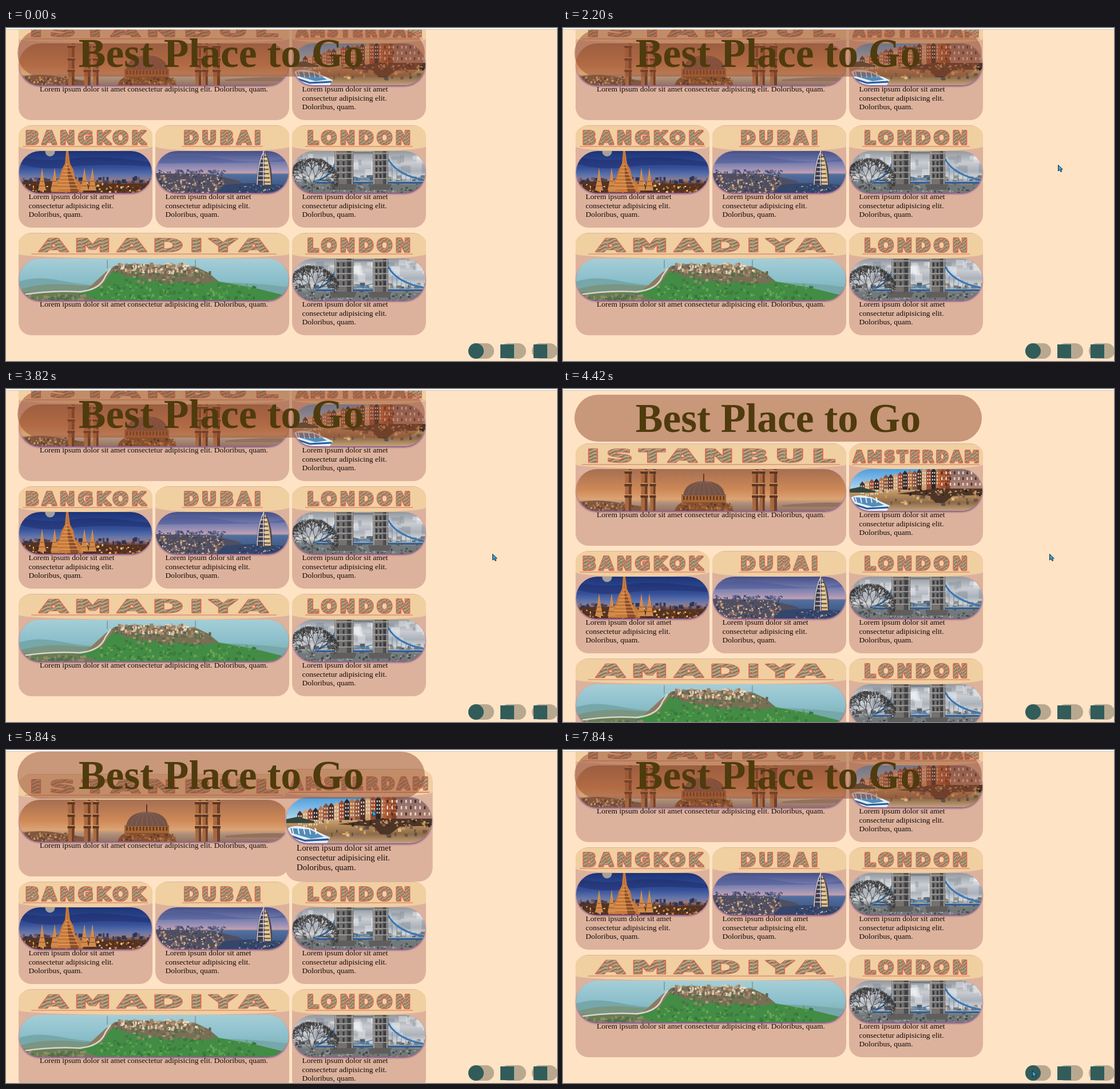
An HTML page that plays this animation: 963 px wide and 582 px high, repeating every 8 s.

```html
<!DOCTYPE html>
<html lang="en">
<head>
<meta charset="utf-8">
<title>Best Place to Go</title>
<style>
  html, body { margin: 0; width: 100%; height: 100%; overflow: hidden; background: #ffe3c5; }
  body { position: relative; font: 13.5px/15.6px "Liberation Serif", "Times New Roman", serif; color: #100c0c; }
  body > *, .card > * { position: absolute; }
  #page { left: 0; top: 0; }
  .card { position: absolute; height: 179px; border-radius: 22px; background: #ddb29c; }
  .banner { left: 0; top: 1px; width: 100%; height: 44px; background: #f0cfa1;
    border-radius: 22px 22px 50% 50% / 16px 16px 8px 8px; }
  .banner text { font: bold 32px "DejaVu Sans", sans-serif; letter-spacing: 5.5px; text-anchor: middle; stroke-linejoin: round; }
  .banner * { vector-effect: non-scaling-stroke; }
  .photo { left: 1px; top: 45px; height: 73px; border-radius: 37px; box-shadow: 0 2px 3px #80508c; }
  .card p { margin: 0; top: 117.5px; }
  #head { left: 20px; width: 712px; height: 82px; border-radius: 41px; background: rgba(147, 76, 48, .5);
    font: bold 71.5px/82px "Liberation Serif", "Times New Roman", serif; color: #4f3b0d; text-align: center; z-index: 2; }
  .pill { top: 551px; width: 45px; height: 27px; border-radius: 13.5px; background: #b9a890; z-index: 3; }
  .pill i { position: absolute; left: 0; top: 1.5px; width: 24px; height: 24px; background: #315c5a; }
  #edge { left: 0; top: 0; width: 100%; height: 2px; background: #fff; border-bottom: 1px solid #cfc4b8; z-index: 4; }
  #cursor { left: 0; top: 0; z-index: 5; overflow: visible; }
</style>
</head>
<body>
<svg width="0" height="0">
  <pattern id="weave" width="9" height="6" patternUnits="userSpaceOnUse">
    <path fill="#a18c6c" d="M0 0H9V6H0Z"/>
    <path stroke="#cbb896" d="M0 5L5 1M5 6L9 3"/>
    <path stroke="#75634a" d="M1 6L6 2M6 0L9 1"/>
  </pattern>
</svg>
<div id="page"></div>
<div id="head">Best Place to Go</div>
<div class="pill" style="left:808px"><i style="width:27px;height:27px;top:0;border-radius:50%"></i></div>
<div class="pill" style="left:864px"><i></i></div>
<div class="pill" style="left:919px"><i style="left:3px"></i></div>
<div id="edge"></div>
<svg id="cursor" width="10" height="14"><path d="M.5.5V11L3 8.7 5 12.5 6.8 11.6 5 8H8.3Z" fill="#35a5dd" stroke="#182a3c"/></svg>
<script>
let seed = 7;
const rnd = () => (seed = seed * 16807 % 2147483647) / 2147483647;
const rect = (x, y, w, h, fill) => `<rect x="${x}" y="${y}" width="${w}" height="${h}" fill="${fill}"/>`;
const path = (d, fill) => `<path d="${d}" fill="${fill}"/>`;
const line = (d, color, width = 1) => `<path d="${d}" fill="none" stroke="${color}" stroke-width="${width}"/>`;
const times = (n, f) => Array.from({ length: n }, (_, i) => f(i)).join('');
const scatter = (n, x, y, w, h, size, ...colors) => times(n, () => rect(x + rnd() * w, y + rnd() * h,
  size * (.5 + rnd()), size * (.5 + rnd()), colors[rnd() * colors.length | 0]));

function branch(x, y, angle, length, depth) {
  const x2 = x + Math.cos(angle) * length, y2 = y + Math.sin(angle) * length;
  const d = `M${x.toFixed(1)} ${y.toFixed(1)}L${x2.toFixed(1)} ${y2.toFixed(1)}`;
  return depth ? d + [-.55, 0, .55].map(a =>
    branch(x2, y2, angle + a + rnd() * .4 - .2, length * .74, depth - 1)).join('') : d;
}

// Each picture gives its sky and the shapes in front of it.
const pictures = {
  ISTANBUL: () => ['#a66f51,#cf8957 50%,#dca474 72%,#ad8f7c 82%,#94745f',
    path('M0 58Q40 51 80 60L120 66V73H0Z', '#80583f') +
    scatter(110, 0, 56, 98, 16, 3, '#a57550', '#5c3e32', '#c8935f', '#714b39') +
    path('M360 63Q420 57 471 59V66H360Z', '#94705e') +
    [[91, 11], [119, 11], [134, 9], [313, 10], [325, 9], [345, 12]].map(([x, w]) =>
      rect(x - w / 2, 0, w, 73, '#a9683c') + rect(x + 1, 0, w / 2 - 1, 73, '#6c402b') +
      [4, 26, 46].map(y => rect(x - w / 2 - 1, y, w + 2, 4, '#593626') + rect(x - w / 2, y - 2, w, 2, '#c98a55')).join('')).join('') +
    path('M172 73Q176 58 196 56H250Q270 58 275 73Z', '#85502f') +
    rect(184, 44, 78, 14, '#a76636') + times(13, i => rect(187 + i * 5.8, 47, 2.5, 7, '#5f3822')) +
    path('M187 46Q190 22 223 21Q257 22 260 46Z', '#745448') +
    times(7, i => line(`M223 21Q${199 + i * 8} 25 ${194 + i * 10} 45`, '#8d6a58', .8)) +
    rect(222, 8, 2, 14, '#5a3b2e') +
    scatter(55, 176, 59, 97, 12, 3, '#bd7a3f', '#5b3828', '#9a6038')],

  AMSTERDAM: () => ['#4f9edd,#a8d2ec 45%,#c99b67 52%,#8d6b4a 80%,#c5a27a',
    times(19, i => {
      const x = 18 + i * 8.3, top = Math.max(0, 19 - i * 1.7 + rnd() * 5);
      const wall = ['#4c2f28', '#8b5138', '#b9744a', '#2f2627', '#a0492f', '#d0a477'][i * 5 % 6];
      return path(`M${x} 36V${top + 3}L${x + 4} ${top - 2}L${x + 8.3} ${top + 3}V36Z`, wall) +
        times(8, j => rect(x + 1.5 + j % 2 * 3.5, top + 5 + (j >> 1) * 6, 1.7, 3, '#eee1ce'));
    }) +
    path('M155 0H233V34H155Z', 'rgba(176,76,35,.6)') +
    times(30, i => rect(160 + i % 10 * 7.4, 4 + (i / 10 | 0) * 10, 2.4, 5, i % 3 ? '#ecd9c2' : '#49291f')) +
    scatter(60, 20, 36, 205, 24, 4, '#cf9d62', '#715640', '#e1bb80', '#57514b') +
    path('M82 43L150 34H233V45L180 47 165 59H150L140 47Z', '#4c3527') +
    scatter(55, 95, 33, 138, 12, 3, '#2d2421', '#8b6544', '#c39867') +
    path('M0 35L18 31 45 38V41H0Z', '#36463b') +
    path('M3 49Q16 42 40 50L70 64 65 73H14L2 61Z', '#e4edf4') +
    path('M7 49L38 51 60 63 40 66 9 57Z', '#548cb8') +
    times(5, i => line(`M${10 + i * 9} 49l2 10`, '#fff', 1.5)) + line('M3 60L30 69 68 67', '#245c9b', 3)],

  BANGKOK: () => ['#1d3477,#344f98 40%,#6377ad 60%,#9a7a83 70%,#6d4635 78%,#40291f',
    `<circle cx="54" cy="1" r="8.5" fill="#a6a09b"/>` + path('M0 10Q50 20 95 13T233 20V27Q140 21 90 28T0 22Z', 'rgba(25,35,95,.4)') +
    scatter(65, 0, 44, 233, 12, 5, '#2d3552', '#49435a', '#68576a') +
    path('M0 55Q50 50 100 55T233 56V73H0Z', '#553321') +
    scatter(130, 0, 54, 233, 18, 2.7, '#d98b39', '#f2c474', '#804420', '#2b2834') +
    path('M82 0H86L89 22 95 33 98 48 110 59 112 72H56L58 59 70 48 74 33 80 22Z', '#c7793d') +
    path('M84 1L85 23 94 47 105 72H90L85 44Z', '#8f4e2b') +
    times(8, i => line(`M${82 - i * 2.6} ${23 + i * 6}h${4 + i * 5.2}`, '#f1b869', 1.2)) +
    [40, 62, 114, 128].map(x => path(`M${x} 29L${x + 3} 49 ${x + 7} 69H${x - 7}L${x - 3} 49Z`, '#d18b4b') +
      line(`M${x - 5} 61h10M${x - 3} 53h6`, '#824924')).join('')],

  DUBAI: () => ['#454f88,#7980af 30%,#b39bb7 49%,#c9a3a7 52%,#536f9f 56%,#334d77',
    path('M0 12Q60 3 120 14T233 11V18Q150 21 100 21T0 22Z', 'rgba(65,80,145,.4)') +
    scatter(65, 0, 32, 120, 7, 3, '#454e74', '#67678a') +
    path('M0 39L100 41 145 52 175 73H0Z', '#504f62') +
    scatter(190, 0, 40, 118, 33, 2.5, '#cda57c', '#816a64', '#303b59', '#ead0a0', '#a27e70') +
    path('M118 60Q165 52 233 61V73H105Z', '#34466b') +
    scatter(35, 145, 58, 87, 14, 2, '#d7b17b', '#70809b', '#1e304d') +
    path('M189 0Q176 20 176 60H203V48Q202 17 189 0Z', '#4a4555') +
    path('M190 2Q200 20 201 59H190Z', '#d9b77a') +
    times(13, i => line(`M${184 - i * .5} ${10 + i * 3.7}H${194 + i * .5}`, i % 2 ? '#ebe0cd' : '#2c324b', 1.3)) +
    line('M189 0Q178 20 177 59M188 0V60', '#e5e4e7', 1.3)],

  LONDON: () => ['#92989f,#c9ccd1 28%,#abb1ba 48%,#d5d5d6 64%,#838b91 76%,#575e60',
    scatter(35, 0, 2, 233, 30, 11, 'rgba(108,116,128,.3)', 'rgba(242,244,247,.4)') +
    scatter(75, 0, 42, 233, 13, 6, '#77797c', '#575c61', '#969187') +
    rect(0, 59, 233, 14, '#737979') + scatter(80, 0, 60, 233, 12, 3, '#9a9e9e', '#555c5d', '#3c464a') +
    line('M74 22Q67 45 39 53M167 14Q181 42 233 52', '#3975b4', 3) +
    line('M74 18Q65 40 41 47M167 10Q187 40 233 49', '#b0c8dc', 1) +
    times(7, i => line(`M${174 + i * 8} ${29 + i * 3}V54`, '#5483aa', .8)) +
    rect(42, 53, 191, 4, '#365e8f') + line('M42 53H233', '#c5d7e3') +
    rect(103, 0, 40, 6, '#72757b') + line('M104 5H143M104 1H143', '#b8bec5') +
    [[73, 33], [140, 27]].map(([x, w]) => rect(x, 0, w, 61, '#74716f') + rect(x + w * .66, 0, w * .34, 61, '#504f51') +
      times(5, i => line(`M${x} ${4 + i * 11}h${w}`, '#aaa59d', 1.3)) +
      times(12, i => rect(x + 5 + i % 3 * (w - 10) / 2.4, 7 + (i / 3 | 0) * 11, 3, 7, '#343b45')) +
      line(`M${x + 2} 0V60m${w - 4} 0V0`, '#a29d97', 2) +
      path(`M${x - 8} 58H${x + w + 6}L${x + w + 2} 68H${x - 5}Z`, '#605e5d')).join('') +
    line('M107 52L140 44M107 45L139 53', '#4a86bd', 1.5) +
    line([-2.5, -1.9, -1.25, -.65].map(a => branch(34, 61, a, 17, 4)).join('') + 'M34 73V58', '#363435', .75)],

  AMADIYA: () => ['#a5ced7,#8bbfcb 50%,#82b4b2 75%,#638c69',
    path('M0 40Q30 30 70 38T150 48L260 42Q380 38 471 50V73H0Z', '#76a7aa') +
    path('M0 54Q45 40 105 47L165 49V73H0Z', '#7a9581') +
    path('M90 73L135 42 164 15 190 10 310 15 331 25 349 40 410 51 471 66V73Z', '#438c45') +
    path('M148 31L166 13 200 9 306 14 331 25 347 40 318 44 287 40 256 43 226 36 187 31 169 21Z', '#796e56') +
    scatter(90, 183, 20, 150, 21, 4, '#958466', '#61634a', '#4d7245', '#b09a78') +
    scatter(140, 167, 7, 140, 16, 4, '#d9c3a3', '#9c8167', '#eee0c9', '#bc9776', '#635e54') +
    scatter(130, 130, 43, 280, 28, 4, '#33793a', '#58a24e', '#6ba557', '#3e7b3d') +
    path('M0 60L95 56 141 73H0Z', '#697d55') + scatter(45, 5, 61, 110, 11, 5, '#8f8d67', '#526e49') +
    path('M115 57L152 23 165 18 144 48Z', '#8b7b61') +
    line('M0 64Q55 55 105 58Q142 55 151 30L160 17', '#d8d7cd', 2.5) +
    line('M154 2V17M308 2V17', '#68757a')]
};

const cards = [['ISTANBUL', 0, 0, 2, 223], ['AMSTERDAM', 2, 0, 1, 224], ['BANGKOK', 0, 1, 1, 219], ['DUBAI', 1, 1, 1, 141],
  ['LONDON', 2, 1, 1, 188], ['AMADIYA', 0, 2, 2, 212], ['LONDON', 2, 2, 1, 188]].map(([city, col, row, span, rule]) => {
  const x = 21.5 + col * 239, y = -18.5 + row * 188, w = span * 239 - 5;
  const [sky, shapes] = pictures[city]();
  const size = city === 'AMSTERDAM' ? 'font-size:26px;letter-spacing:4px' : '';
  const word = (fill, stroke, width) =>
    `<text x="119.5" y="32" style="${size}" fill="${fill}" stroke="${stroke}" stroke-width="${width}">${city}</text>`;
  const el = document.createElement('div');
  el.className = 'card';
  el.style.cssText = `left:${x}px;top:${y}px;width:${w}px`;
  el.innerHTML = `<svg class="banner" viewBox="0 0 234 44" preserveAspectRatio="none">
      ${word('#e5604f', '#e5604f', 4)}${word('url(#weave)', 'url(#weave)', 1.4)}
      ${line(`M${117 - rule / 2} 36h${rule}`, '#d8705a', 1.2)}</svg>
    <svg class="photo" width="${w - 2}" height="73" viewBox="0 0 ${w - 2} 73" style="background:linear-gradient(${sky})">${shapes}</svg>
    <p style="left:${span > 1 ? 37.5 : 18}px;width:${span > 1 ? 420 : 180}px">Lorem ipsum dolor sit amet consectetur adipisicing elit. Doloribus, quam.</p>`;
  page.append(el);
  return { el, x, y, w };
});

// Time, then pointer position; every pose is held until the next.
const moves = [[0, 980, 600], [200, 940, 540], [400, 915, 480], [600, 890, 430], [800, 860, 385], [1000, 828, 345], [1180, 795, 319],
  [1380, 758, 424], [1580, 700, 440], [1780, 690, 425], [2000, 790, 330], [2200, 865, 239], [2400, 850, 260],
  [2600, 790, 270], [2800, 715, 240], [3000, 690, 150], [3220, 720, 110], [3420, 893, 200], [3620, 848, 277], [3820, 850, 288],
  [5020, 820, 262], [5240, 750, 195], [5440, 680, 122], [5640, 636, 96], [5840, 640, 105], [6050, 660, 125],
  [6240, 790, 170], [6440, 894, 216], [6640, 925, 250], [6840, 938, 290], [7040, 910, 340], [7240, 860, 383],
  [7440, 845, 450], [7640, 830, 520], [7840, 820, 560]];
const scrolls = [[0, 0], [4420, 113], [4630, 151], [5840, 60], [6050, 0]];
const at = (list, t) => list.findLast(step => step[0] <= t);

function draw(now) {
  const t = now % 8000;
  const [, x, y] = at(moves, t), scroll = at(scrolls, t)[1];
  const headTop = Math.max(3, scroll - 103);
  page.style.top = scroll + 'px';
  head.style.top = headTop + 'px';
  cursor.style.transform = `translate(${x}px,${y}px)`;
  for (const c of cards) {
    const top = c.y + scroll;
    const over = y > headTop + 82 && x > c.x && x < c.x + c.w && y > top && y < top + 179;
    c.el.style.transform = over ? 'scale(1.1)' : '';
    c.el.style.zIndex = over ? 1 : 0;
  }
  requestAnimationFrame(draw);
}
const page0 = performance.now();
draw(0);
</script>
</body>
</html>
```
